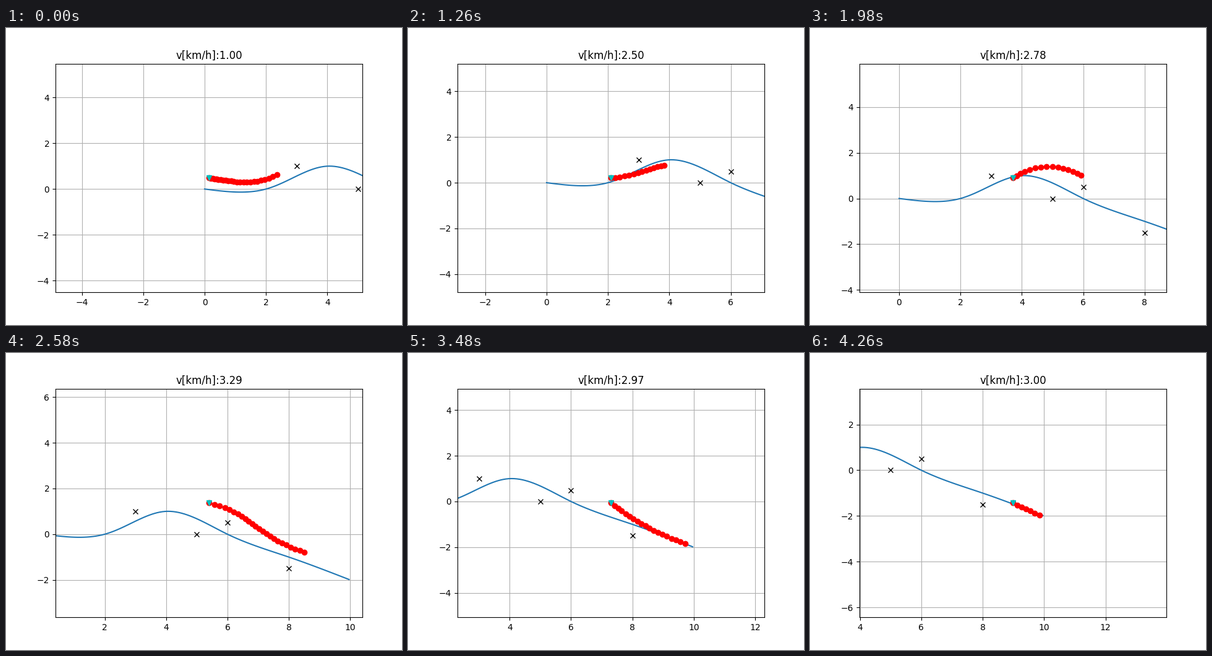
A matplotlib script for the animation above (4320 ms loop, 640 by 480 pixels).

```python
import numpy as np
import matplotlib.pyplot as plt
from matplotlib.animation import FuncAnimation

FRAMES, INTERVAL = 72, 60
DT = 0.2      # simulated seconds per frame
AREA = 5.0    # half width of the view
KMH = 3.6

WAYPOINTS = np.array([(0, 0), (2, 0), (4, 1), (6, 0), (8, -1), (10, -2)], float)
OBSTACLES = np.array([(3, 1), (5, 0), (6, 0.5), (8, -1.5)])

# frame, s, s accel, d, d speed, d accel, speed [km/h]
STATES = np.array([
    (0, 0.0556, 0.03, 0.500, 0.000, 0.00, 1.00),
    (9, 0.705, 0.15, 0.489, -0.020, 0.00, 1.57),
    (21, 2.172, 0.00, 0.153, -0.225, -0.05, 2.50),
    (33, 3.890, -0.04, -0.043, 0.250, 0.60, 2.78),
    (43, 5.346, 0.05, 0.795, 0.226, -0.11, 3.29),
    (58, 7.657, 0.02, 0.565, -0.290, -0.03, 2.97),
    (71, 9.790, 0.00, 0.040, -0.080, 0.00, 3.00),
])

# first frame, plan points at start and end, goal offset, goal speed [km/h]
PHASES = [
    (0, 24, 24, 0.4, 3.0),
    (5, 24, 24, -0.2, 3.0),
    (9, 24, 19, -0.2, 3.0),
    (15, 19, 14, -0.2, 2.5),
    (21, 14, 11, -0.2, 2.5),
    (27, 18, 12, 0.8, 2.5),
    (39, 24, 24, 0.4, 3.0),
    (50, 24, 19, 0.0, 3.0),
    (58, 19, 19, 0.0, 3.0),
]


class Course:
    """Natural cubic spline through the waypoints, by chord length."""

    def __init__(self, pts):
        h = np.hypot(*np.diff(pts, axis=0).T)
        self.knots = np.concatenate([[0], np.cumsum(h)])
        self.length = self.knots[-1]
        n = len(pts)
        slope = np.diff(pts, axis=0) / h[:, None]
        mat, rhs = np.eye(n), np.zeros((n, 2))
        for i in range(1, n - 1):
            mat[i, i - 1:i + 2] = h[i - 1], 2 * (h[i - 1] + h[i]), h[i]
            rhs[i] = 6 * (slope[i] - slope[i - 1])
        m = np.linalg.solve(mat, rhs)
        hc = h[:, None]
        self.a = pts[:-1]
        self.b = slope - hc * (2 * m[:-1] + m[1:]) / 6
        self.c = m[:-1] / 2
        self.d = np.diff(m, axis=0) / (6 * hc)

    def eval(self, s):
        s = np.atleast_1d(s)
        i = np.clip(np.searchsorted(self.knots, s, side="right") - 1,
                    0, len(self.a) - 1)
        u = (s - self.knots[i])[:, None]
        a, b, c, d = self.a[i], self.b[i], self.c[i], self.d[i]
        return (a + u * (b + u * (c + u * d)),
                b + u * (2 * c + 3 * u * d),
                2 * c + 6 * u * d)

    def curvature(self, s):
        _, (v,), (w,) = self.eval(s)
        return (v[0] * w[1] - v[1] * w[0]) / np.hypot(*v) ** 3

    def to_xy(self, s, d):
        pos, vel, _ = self.eval(s)
        yaw = np.arctan2(vel[:, 1], vel[:, 0])
        return pos[:, 0] - d * np.sin(yaw), pos[:, 1] + d * np.cos(yaw)


def quintic(T, p0, v0, a0, p1, v1, a1):
    A = p1 - p0 - v0 * T - a0 * T**2 / 2
    B = v1 - v0 - a0 * T
    C = a1 - a0
    return np.poly1d([
        6 * A / T**5 - 3 * B / T**4 + C / (2 * T**3),
        -15 * A / T**4 + 7 * B / T**3 - C / T**2,
        10 * A / T**3 - 4 * B / T**2 + C / (2 * T),
        a0 / 2, v0, p0])


course = Course(WAYPOINTS)


def along_speed(row):
    """Speed along the course that gives the row's true speed."""
    _, s, _, d, dv, _, v = row
    return np.sqrt((v / KMH) ** 2 - dv ** 2) / (1 - course.curvature(s) * d)


def build_legs():
    legs = []
    for p, q in zip(STATES[:-1], STATES[1:]):
        T = (q[0] - p[0]) * DT
        s = quintic(T, p[1], along_speed(p), p[2], q[1], along_speed(q), q[2])
        d = quintic(T, *p[3:6], *q[3:6])
        legs.append((p[0], s, d))
    return legs


LEGS = build_legs()


def derivs(poly, t):
    return poly(t), poly.deriv()(t), poly.deriv(2)(t)


def car_state(k):
    start, s, d = [leg for leg in LEGS if leg[0] <= k][-1]
    t = (k - start) * DT
    return derivs(s, t), derivs(d, t)


def plan(k, s_state, d_state):
    i = max(j for j, p in enumerate(PHASES) if p[0] <= k)
    start, n0, n1, goal_d, goal_v = PHASES[i]
    end = PHASES[i + 1][0] if i + 1 < len(PHASES) else FRAMES
    n = int(round(n0 + (n1 - n0) * (k - start) / (end - start)))
    T = n * DT
    s0, v0, a0 = s_state
    v1 = goal_v / KMH
    s1 = s0 + T * (v0 + v1) / 2 + a0 * T**2 / 12
    t = np.arange(n) * DT
    s = quintic(T, s0, v0, a0, s1, v1, 0)(t)
    d = quintic(T, *d_state, goal_d, 0, 0)(t)
    keep = s <= course.length
    return course.to_xy(s[keep], d[keep])


fig, ax = plt.subplots(figsize=(6.4, 4.8), dpi=100)
road = course.eval(np.arange(0, course.length, 0.1))[0]
ax.plot(road[:, 0], road[:, 1])
ax.plot(OBSTACLES[:, 0], OBSTACLES[:, 1], "xk")
path_line, = ax.plot([], [], "-or")
car, = ax.plot([], [], "vc")
title = ax.set_title("")
ax.grid(True)


def update(k):
    s_state, d_state = car_state(k)
    x, y = plan(k, s_state, d_state)
    path_line.set_data(x, y)
    car.set_data(x[:1], y[:1])
    ax.set_xlim(x[0] - AREA, x[0] + AREA)
    ax.set_ylim(y[0] - AREA, y[0] + AREA)
    forward = (1 - course.curvature(s_state[0]) * d_state[0]) * s_state[1]
    title.set_text(f"v[km/h]:{np.hypot(forward, d_state[1]) * KMH:.2f}")
    return path_line, car, title


anim = FuncAnimation(fig, update, frames=FRAMES, interval=INTERVAL, repeat=True)
plt.show()
```
